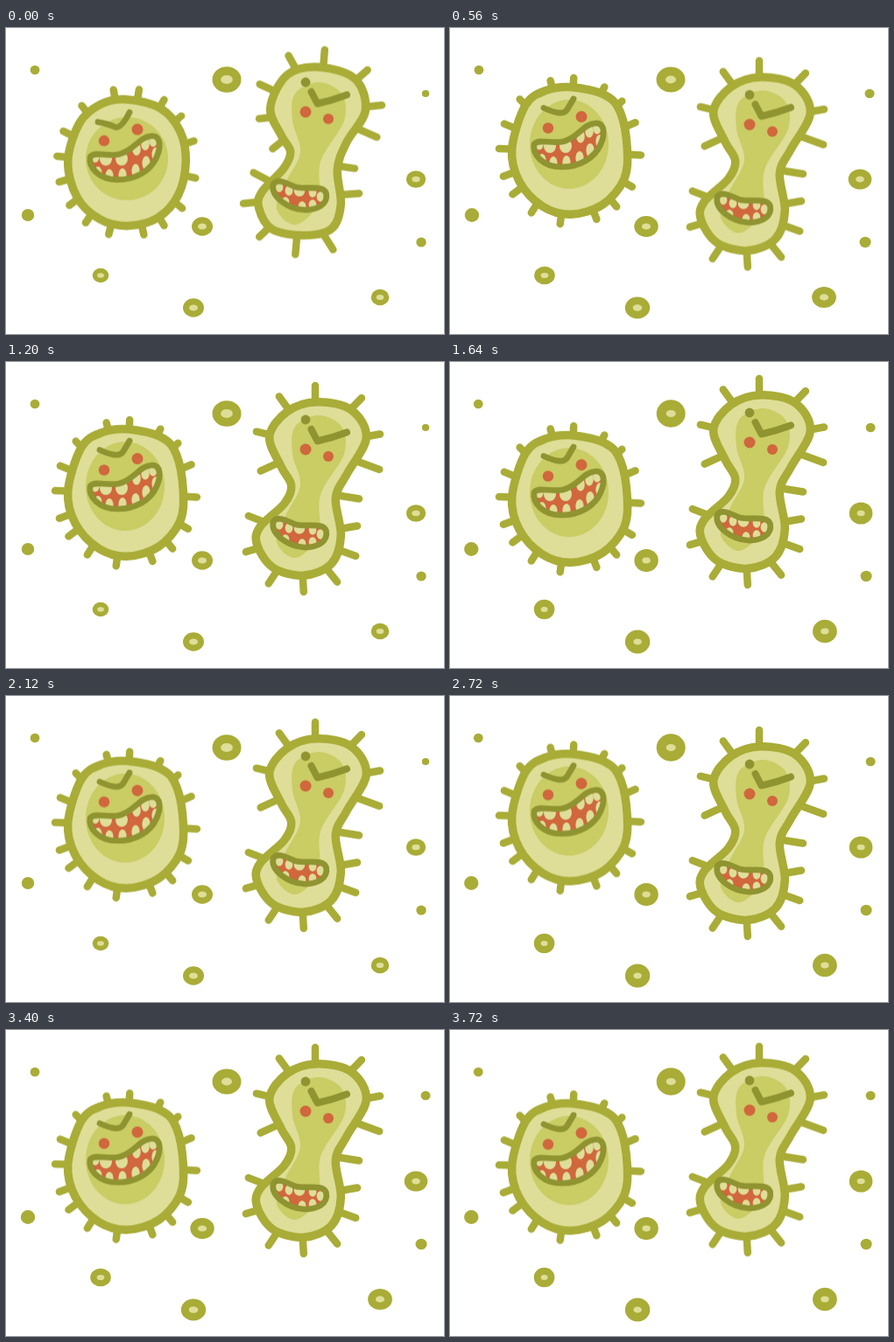
An HTML page that plays this animation: 500 px wide and 350 px high, repeating every 3.76 s.

```html
<!DOCTYPE html>
<html lang="en">
<head>
<meta charset="utf-8">
<title>Germs</title>
<style>
  html, body { margin: 0; width: 100%; height: 100%; overflow: hidden; background: #fff; }
  svg { display: block; width: 500px; height: 350px; }

  .bob { animation: 1880ms ease -60ms infinite; }
  #left { animation-name: bob-left; }
  #right { animation-name: bob-right; }
  @keyframes bob-left {
    0%, 100% { transform: translateY(8.5px); }
    50% { transform: translateY(-9.5px); }
  }
  @keyframes bob-right {
    0%, 100% { transform: translateY(-9.5px); }
    50% { transform: translateY(11px); }
  }

  .dots, .pose { animation: 940ms step-end infinite; }
  .dots { animation-name: third; }
  .pose-a { animation-name: pose-a; }
  .pose-b { animation-name: pose-b; }
  @keyframes third { 0% { visibility: visible; } 33.333%, 100% { visibility: hidden; } }
  @keyframes pose-a { 0% { visibility: visible; } 23%, 100% { visibility: hidden; } }
  @keyframes pose-b { 0% { visibility: hidden; } 23%, 100% { visibility: visible; } }

  .olive { fill: #a9ac36; }
  .light { fill: #dede98; }
  .core { fill: #cacc64; }
  .red { fill: #d0673d; }
  .dark { fill: #8f9431; }
  .rim { fill: #dede98; stroke: #a9ac36; stroke-width: 9.5; stroke-linejoin: round; }
  .spikes { fill: none; stroke: #a9ac36; stroke-width: 8.5; stroke-linecap: round; }
  .line { fill: none; stroke: #8f9431; stroke-linecap: round; stroke-linejoin: round; }
</style>
</head>
<body>
<svg id="stage" viewBox="0 0 500 350" xmlns="http://www.w3.org/2000/svg"></svg>
<script>
const RIM = 9.5;
const round = n => Math.round(n * 10) / 10;

const pairs = flat => {
  const out = [];
  for (let i = 0; i < flat.length; i += 2) out.push([flat[i], flat[i + 1]]);
  return out;
};

// Closed smooth curve through the points.
function smooth(pts) {
  const at = i => pts[(i + pts.length) % pts.length];
  let d = `M${pts[0].map(round)}`;
  pts.forEach((p, i) => {
    const a = at(i - 1), q = at(i + 1), b = at(i + 2);
    const c1 = [0, 1].map(k => round(p[k] + (q[k] - a[k]) / 6));
    const c2 = [0, 1].map(k => round(q[k] - (b[k] - p[k]) / 6));
    d += `C${c1} ${c2} ${q.map(round)}`;
  });
  return d + 'Z';
}

// Moves a counterclockwise outline inwards.
function inset(pts, by) {
  const n = pts.length;
  return pts.map((p, i) => {
    const a = pts[(i + n - 1) % n], b = pts[(i + 1) % n];
    const dx = b[0] - a[0], dy = b[1] - a[1], len = Math.hypot(dx, dy);
    return [p[0] + dy / len * by, p[1] - dx / len * by];
  });
}

const spoke = (hub, [x, y]) => {
  const k = 1 - 3 / Math.hypot(x - hub[0], y - hub[1]);
  return `M${hub}L${[hub[0] + (x - hub[0]) * k, hub[1] + (y - hub[1]) * k].map(round)}`;
};

const fan = (hub, tips) => pairs(tips).map(tip => spoke(hub, tip)).join('');

// Spikes that end on an ellipse around the hub, at the given degrees.
const ring = (hub, rx, ry, degrees) => degrees.map(deg => {
  const a = deg * Math.PI / 180;
  return spoke(hub, [hub[0] + rx * Math.cos(a), hub[1] + ry * Math.sin(a)]);
}).join('');

const ellipse = (cls, x, y, rx, ry = rx) =>
  `<ellipse class="${cls}" cx="${x}" cy="${y}" rx="${round(rx)}" ry="${round(ry)}"/>`;

const line = (d, width) => `<path class="line" d="${d}" stroke-width="${width}"/>`;

const teeth = (rx, ry, spots) => pairs(spots).map(([x, y]) => ellipse('light', x, y, rx, ry)).join('');

const mouth = (id, d, inside) => `
  <clipPath id="${id}"><path d="${d}"/></clipPath>
  <path class="red" d="${d}"/>
  <g clip-path="url(#${id})">${inside}</g>
  ${line(d, 6.7)}`;

const leftFace = (id, brow) => line(brow, 6.8) +
  ellipse('red', 112, 122.5, 6.2) + ellipse('red', 150, 109.5, 6.5) +
  mouth(id,
    'M96 141C101 134 117 141 129 138C146 134 152 118 166 117C177 116 177 130 172 141C165 157 148 167 127 167C106 167 94 153 96 141Z',
    teeth(7, 8, [114, 143, 132, 143]) +
    teeth(4.8, 7.5, [102, 140, 149, 132, 159, 126, 168, 122]) +
    teeth(4.6, 8, [105, 160, 118, 163, 133, 162, 148, 157, 160, 148, 171, 138]));

const rightFace = id => ellipse('dark', 342, 67, 5.4) +
  line('M348.5 78L355.5 91.5Q372 88 389 81.5', 8) +
  ellipse('red', 342, 101, 6.5) + ellipse('red', 368, 109, 6) +
  mouth(id,
    'M305 184C309 176 321 183 331 187C344 190 362 184 365.5 194C368 207 355 213.5 340 213C322 212 302 198 305 184Z',
    teeth(6.3, 6.8, [335, 191]) +
    teeth(4.4, 5.7, [312, 187, 323, 191, 350, 193, 319, 204, 338, 209, 350, 207, 359, 198]));

const pose = (name, { outline, core, spikes, face, faceY = 0, y = 0 }) => `
  <g class="pose pose-${name}"><g transform="translate(0 ${y})">
    <path class="spikes" d="${spikes}"/>
    <path class="rim" d="${smooth(inset(pairs(outline), RIM / 2))}"/>
    ${core}
    <g transform="translate(0 ${faceY})">${face}</g>
  </g></g>`;

const leftA = {
  outline: [138, 77, 106, 83, 80, 106, 66, 152, 77, 196, 105, 223,
    140, 231, 176, 221, 201, 193, 210, 153, 203, 116, 179, 88],
  core: ellipse('core', 138, 149.5, 47, 47.5),
  spikes: ring([138, 154], 83, 88,
    [-101, -80, -58, -39, -17, 12, 38, 58, 76, 105, 126, 145, 165, 185, 205, 230]),
  y: -7.7, faceY: 6.5,
  face: leftFace('bite-la', 'M105 101Q117 103 125 107Q132 108 141 90')
};

const leftB = {
  outline: [140, 71, 108, 75, 82, 94, 66, 146, 75, 186, 103, 216,
    138, 226, 177, 214, 203, 183, 207, 146, 199, 103, 180, 81],
  core: ellipse('core', 136, 141, 45, 51),
  spikes: ring([137, 149], 84, 87,
    [-106, -87, -61, -43, -23, 3, 29, 49, 68, 98, 123, 144, 160, 182, 202, 225]),
  face: leftFace('bite-lb', 'M107 99.5Q118 104.5 124 105Q131 106 134 101L141 89')
};

const rightCore = `<path class="core" d="${smooth(pairs(
  [357, 62, 330, 75, 327, 106, 336, 142, 319, 177, 309, 207, 331, 225, 357, 199, 359, 153, 386, 106, 383, 75]))}"/>`;

const rightA = {
  outline: [358, 40, 318, 50, 297, 91, 310, 125, 320, 142, 313, 158, 288, 185, 284, 207,
    301, 234, 340, 242, 375, 233, 387, 202, 383, 162, 393, 133, 415, 95, 402, 55],
  core: rightCore,
  spikes: fan([358, 96], [321, 29, 364, 22, 415, 46, 432, 88, 426, 126, 302, 140, 286, 104, 287, 63]) +
    fan([352, 154], [401, 161]) +
    fan([336, 194], [406, 189, 375, 256, 330, 262, 287, 241, 268, 201, 280, 164]),
  y: 8.5, faceY: -5, face: rightFace('bite-ra')
};

const rightB = {
  outline: [355, 42, 318, 54, 296, 86, 310, 123, 321, 143, 314, 160, 286, 187, 282, 211,
    302, 240, 340, 250, 375, 235, 387, 200, 381, 157, 393, 132, 416, 88, 397, 52],
  core: rightCore,
  spikes: fan([353, 97], [353, 25, 310, 38, 408, 40, 430, 83, 429, 125, 288, 127, 283, 80]) +
    fan([350, 149], [406, 158]) +
    fan([336, 200], [404, 188, 402, 224, 380, 255, 340, 267, 298, 257, 271, 219, 274, 176]),
  face: rightFace('bite-rb')
};

// x, y, radius, growth between drawings
const specks = [33, 48, 5.4, 0, 479, 75, 4.2, 1.3, 25, 214, 7.2, 1, 474, 245, 5.7, .8];
const rings = [252, 59, 16.5, 0, 468, 173, 11, 2.3, 224, 227, 12, 1.7,
  108, 283, 9.3, 2.5, 214, 320, 12, 2.2, 427, 308, 10.3, 3.6];
const flat = [.89, .87, .95];
const hole = [.42, .37, .34];

const dot = (i, hollow) => ([[x, y], [r, grow]]) => {
  const cx = round(x + (i === 2 ? (x - 200) / 250 : 0));
  const rx = r + (i ? grow : 0), hx = rx * hole[i];
  return ellipse('olive', cx, y, rx, rx * (hollow ? flat[i] : .96)) +
    (hollow ? ellipse('light', cx, y, hx, hx * .72) : '');
};

const each = (list, draw) => {
  const p = pairs(list);
  return p.map((at, k) => k % 2 ? '' : draw([at, p[k + 1]])).join('');
};

const dotSet = i => `<g class="dots" style="animation-delay:${round((i / 3 - 1) * 940)}ms">
  ${each(specks, dot(i, false))}${each(rings, dot(i, true))}</g>`;

document.getElementById('stage').innerHTML =
  [0, 1, 2].map(dotSet).join('') +
  `<g id="left" class="bob">${pose('a', leftA)}${pose('b', leftB)}</g>` +
  `<g id="right" class="bob">${pose('a', rightA)}${pose('b', rightB)}</g>`;
</script>
</body>
</html>
```
